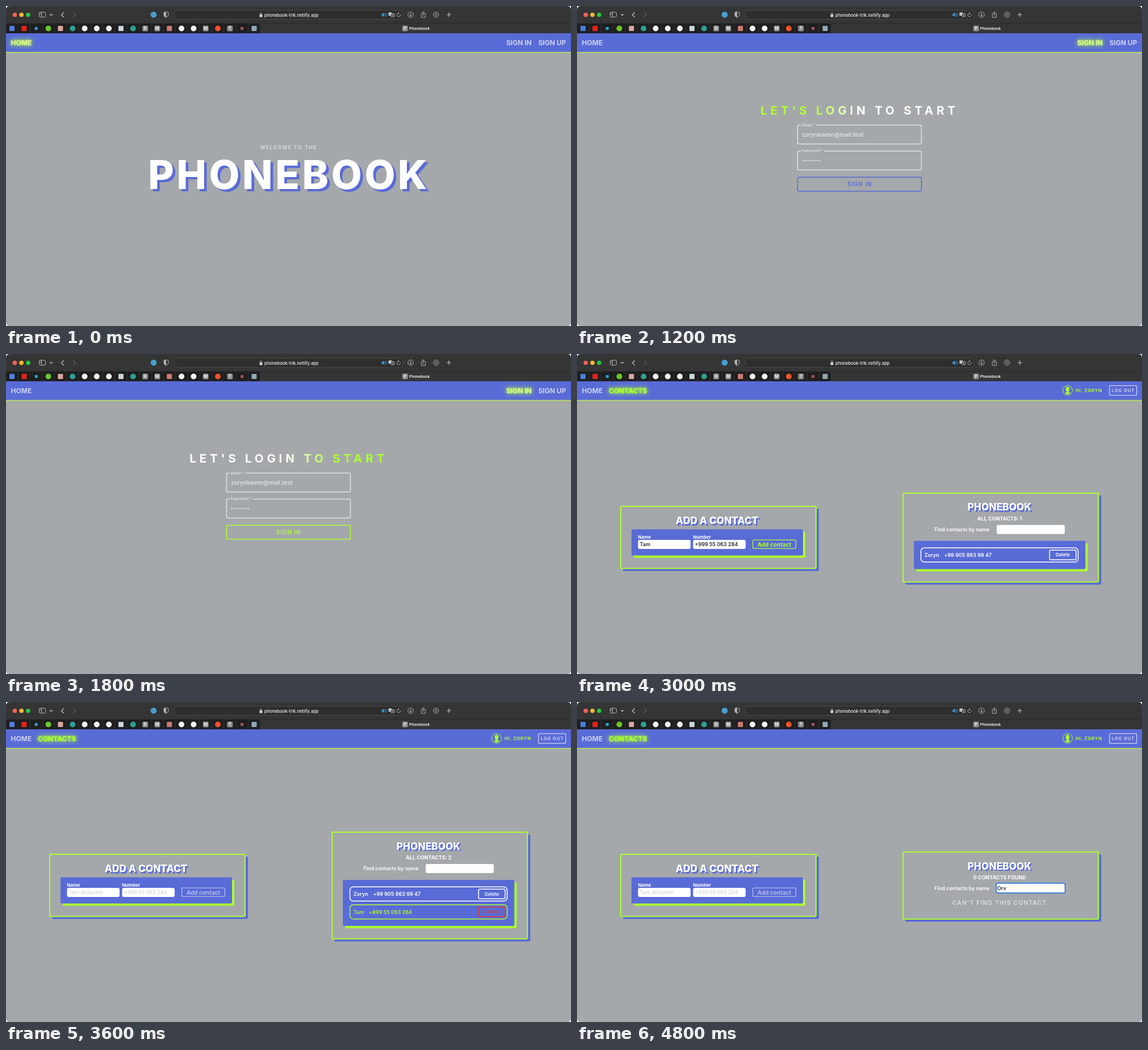
Recreate the animation shown at these times as an HTML page. Size 995 by 563 pixels, loop 5400 ms.

```html
<!DOCTYPE html>
<html lang="en">
<head>
<meta charset="utf-8">
<title>Phonebook</title>
<style>
  html, body { margin: 0; width: 100%; height: 100%; overflow: hidden; background: #fff; }
  svg { display: block; width: 100%; height: 100%; }
  text { font-family: Inter, "Open Sans", sans-serif; white-space: pre; }
  .glow { filter: drop-shadow(0 0 1.5px #adff2f) drop-shadow(0 0 4px #adff2f); }
</style>
</head>
<body>
<svg viewBox="0 0 995 563">
  <defs>
    <clipPath id="window"><rect width="995" height="563" rx="6"/></clipPath>
    <linearGradient id="greenLeft" gradientUnits="userSpaceOnUse" x1="415" x2="497">
      <stop stop-color="#adff2f"/><stop offset="1" stop-color="#fff"/>
    </linearGradient>
    <linearGradient id="greenRight" gradientUnits="userSpaceOnUse" x1="490" x2="580">
      <stop stop-color="#fff"/><stop offset="1" stop-color="#adff2f"/>
    </linearGradient>
  </defs>
  <g clip-path="url(#window)"><g id="browser"></g><g id="page"></g></g>
</svg>
<script>
const GREEN = '#adff2f', BLUE = '#596bd6', GREY = '#a4a8ab', PALE = '#dfe1e2', LINK = '#cbd0f2', RED = '#dc3a35';
const STEP = 600;

const user = { name: 'Zoryn', phone: '+99 905 863 99 47' };
const friend = { name: 'Tam', phone: '+999 55 063 284' };

// Drawing helpers: each returns SVG markup.
const text = (x, y, size, content, { fill = '#fff', weight = 600, spacing = 0, anchor = 'start', cls = '' } = {}) =>
  `<text x="${x}" y="${y}" font-size="${size}" fill="${fill}" font-weight="${weight}" letter-spacing="${spacing}" text-anchor="${anchor}" class="${cls}">${content}</text>`;
const centered = (x, y, size, content, style) => text(x, y, size, content, { anchor: 'middle', ...style });
const rect = (x, y, w, h, { fill = 'none', stroke = 'none', width = 1.5, r = 2 } = {}) =>
  `<rect x="${x}" y="${y}" width="${w}" height="${h}" rx="${r}" fill="${fill}" stroke="${stroke}" stroke-width="${width}"/>`;
const circle = (x, y, r, fill, stroke = 'none') =>
  `<circle cx="${x}" cy="${y}" r="${r}" fill="${fill}" stroke="${stroke}"/>`;
const path = (d, stroke = '#b4b4b4', width = 1, fill = 'none') =>
  `<path d="${d}" stroke="${stroke}" stroke-width="${width}" fill="${fill}" stroke-linecap="round" stroke-linejoin="round"/>`;
const shadowed = (x, y, size, content, offset, spacing = 0) =>
  [[offset, BLUE], [0, '#fff']].map(([d, fill]) =>
    centered(x + d, y + d, size, content, { fill, weight: 800, spacing })).join('');

function favicons() {
  const icons = ['s4b7fe0', 's e8221c', 'd2f9fd8', 'c6cc62a', 'sdca6a0', 'c2c9f93', 'cf2f2f2', 'cf2f2f2', 'cf5f5f5',
    'scbd6da', 'c2c9f93', 'R', 'M', 'sd07a70', 'cf5f5f5', 'cf5f5f5', 'M', 'cf0522a', 'T', 'da8505c', 's93a7b5'];
  return icons.map((icon, i) => {
    const x = 10.6 + 21.32 * i, color = '#' + icon.slice(1).trim();
    const shape = icon.length === 1 ? letterIcon(x, icon)
      : icon[0] === 'c' ? circle(x, 39.5, 5, color)
      : icon[0] === 'd' ? rect(x - 2.5, 37, 5, 5, { fill: color, r: 0 })
      : rect(x - 4.5, 35, 9, 9, { fill: color, r: 1 });
    return shape + path(`M${x + 10.7} 32V47`, '#3d3d3d', .7);
  }).join('');
}

const letterIcon = (x, letter) =>
  rect(x - 5, 34.5, 10, 10, { fill: '#8d8d91' }) + centered(x, 42.2, 7.2, letter);

function browserChrome() {
  return rect(0, 0, 995, 48, { fill: '#353535', r: 0 })
    + rect(0, 31, 447, 17, { fill: '#1f1f1f', r: 0 }) + path('M0 30.7H995', '#262626', .7)
    + ['#ff5f57', '#febc2e', '#28c840'].map((c, i) => circle(15.4 + 11.8 * i, 15.5, 3.8, c)).join('')
    + rect(58.5, 11, 11, 8.6, { stroke: '#b4b4b4', width: 1 }) + path('M62.5 11V19.5M60 13.2H61M60 15.2H61')
    + path('M77.5 14.5L79.7 16.5L81.9 14.5', '#c4c4c4', 1.1)
    + path('M101.5 11.5L97.5 15.5L101.5 19.5', '#c4c4c4', 1.2) + path('M118.5 11.5L122.5 15.5L118.5 19.5', '#5c5c5c', 1.2)
    + circle(260, 15.2, 5.3, '#459fd2')
    + path('M282 10.3L286 11.6V15.5Q286 18.7 282 20.2Q278 18.7 278 15.5V11.6Z', '#b4b4b4', .9)
    + path('M282 10.3V20.2Q278 18.7 278 15.5V11.6Z', 'none', 0, '#b4b4b4')
    + rect(296.5, 7.5, 402, 16, { fill: '#2e2e2e', stroke: '#4b4b4b', width: .9, r: 4 })
    + rect(446.5, 15, 5, 4.4, { fill: '#d5d5d5', r: .8 }) + path('M447.4 15V13.8Q447.4 12.3 449 12.3T450.6 13.8V15', '#d5d5d5', .9)
    + text(455, 18.6, 7.5, 'phonebook-trlk.netlify.app', { fill: '#f0f0f0', weight: 500 })
    + path('M661.8 14H663.3L665.6 12V19L663.3 17H661.8Z', '#3d9be0', .5, '#3d9be0') + path('M667.3 13.6Q668.6 15.5 667.3 17.4M669 12.2Q671.2 15.5 669 18.8', '#3d9be0', .9)
    + rect(673.5, 11.3, 6, 5.6, { fill: '#c4c4c4', r: 1.2 }) + rect(678, 13.4, 6, 5.6, { fill: '#2e2e2e', stroke: '#c4c4c4', width: .9, r: 1.2 })
    + centered(681, 18, 4.2, 'A', { fill: '#c4c4c4' })
    + path('M694.3 14.8A3.1 3.1 0 1 1 692.2 12.8L690.8 11.5M692.2 12.8L690.8 14', '#c4c4c4', .9)
    + circle(712.6, 15.3, 4.8, 'none', '#b4b4b4') + path('M712.6 12.7V17.7M710.6 15.9L712.6 17.8L714.6 15.9')
    + path('M733 13.7H731.3V20H738.7V13.7H737M735 17V10.2M733 12L735 10L737 12')
    + circle(757.4, 15.3, 4.6, 'none', '#b4b4b4') + circle(757.4, 15.3, 1.9, 'none', '#b4b4b4')
    + path('M776.3 15.3H783.3M779.8 11.8V18.8', '#c4c4c4', 1.1)
    + favicons() + letterIcon(702.8, 'P') + text(710, 42, 6.6, 'Phonebook')
    + rect(0, 48, 995, 515, { fill: GREY, r: 0 }) + rect(0, 48, 995, 33, { fill: BLUE, r: 0 })
    + rect(0, 80.8, 995, 1.6, { fill: '#b4e657', r: 0 });
}

function navLink(x, label, active, activeFill = '#e2f3a4') {
  return text(x, 69, 12, label, { weight: 700, fill: active ? activeFill : LINK, cls: active ? 'glow' : '' });
}

const guestNav = active =>
  [[8.5, 'HOME'], [881, 'SIGN IN'], [937.5, 'SIGN UP']].map(([x, label]) => navLink(x, label, label === active)).join('');

const memberNav = () => navLink(8.5, 'HOME') + navLink(56, 'CONTACTS', true, GREEN)
  + circle(864, 64, 8.5, 'none', GREEN)
  + `<ellipse cx="864" cy="62" rx="3.3" ry="4.2" fill="${GREEN}"/>` + path('M862.4 65H865.6V67L869 68.8Q864 73 859 68.8L862.4 67Z', 'none', 0, GREEN)
  + text(878, 66.8, 7.8, `HI, ${user.name.toUpperCase()}`, { fill: GREEN, weight: 700, spacing: .8 })
  + rect(937.7, 55.7, 48, 17, { stroke: LINK, width: 1.3 })
  + centered(962, 66.8, 7.8, 'LOG OUT', { fill: LINK, weight: 700, spacing: .8 });

const home = () => guestNav('HOME')
  + centered(498, 252.2, 8.6, 'WELCOME TO THE', { fill: PALE, spacing: 1.6 })
  + shadowed(498.3, 321.5, 70, 'PHONEBOOK', 4.6, 4.6);

function field(y, label, notch, value) {
  const content = typeof value === 'number'
    ? `<path d="M397.5 ${y + 17.3}h${3.7 * (value - 1) + .1}" stroke="${PALE}" stroke-width="2.3" stroke-linecap="round" stroke-dasharray="0 3.7"/>`
    : text(396, y + 20.6, 10, value, { fill: PALE });
  return rect(388.5, y + .5, 218, 33.3, { stroke: PALE, r: 2.5 })
    + rect(394, y - 1, notch, 3, { fill: GREY, r: 0 })
    + text(396, y + 2.5, 6.6, label + ' *', { fill: PALE }) + content;
}

function authPage(active, title, gradient, fields, color) {
  const buttonY = 209.5 + 45.7 * fields.length;
  return guestNav(active)
    + centered(497.6, 191, 20.5, title, { fill: `url(#${gradient})`, weight: 700, spacing: 5.8 })
    + fields.map((f, i) => field(209 + 45.7 * i, ...f)).join('')
    + rect(388.5, buttonY + .4, 218, 24.4, { stroke: color, r: 2.5 })
    + centered(497.8, buttonY + 16.3, 10, active, { fill: color, spacing: .9 });
}

const signUp = () => authPage('SIGN UP', "LET'S CREATE YOUR ACCOUNT", 'greenLeft',
  [['Name', 29, user.name], ['Email', 28, 'zrnktvzrnkl@mail.test'], ['Password', 41, 11]], BLUE);
const signIn = (gradient, color) => authPage('SIGN IN', "LET'S LOGIN TO START", gradient,
  [['Email', 28, 'zorynkwmn@mail.test'], ['Password', 41, 9]], color);

const card = (x, y, h) => rect(x + 4, y + 4, 345, h + .5, { fill: BLUE })
  + rect(x, y, 344, h, { fill: GREY, stroke: GREEN, width: 2 });
const panel = (x, y, h) => rect(x + 4, y + 4, 302, h, { fill: GREEN }) + rect(x, y, 302, h, { fill: BLUE });

function addForm(filled) {
  const input = (x, label, sample, value) => text(x, 325, 8, label, { weight: 700 })
    + rect(x, 327, 92.5, 16, { fill: '#fff', r: 3 })
    + text(x + 3, 338.3, 9, filled ? value : sample, { fill: filled ? '#2b2b2b' : '#d9d9d9' });
  const color = filled ? GREEN : '#b2baeb';
  return card(77, 268, 109.3) + shadowed(246.7, 299, 17.3, 'ADD A CONTACT', 2.5)
    + panel(96, 308.5, 46)
    + input(107.5, 'Name', 'Tam Wolpreth', friend.name) + input(204.5, 'Number', friend.phone, friend.phone)
    + rect(309.6, 327.2, 75.8, 15, { stroke: color, width: 1.3 })
    + centered(347.5, 338.5, 10, 'Add contact', { fill: color, weight: 700 });
}

function contactRow(y, { name, phone }, hovered) {
  const color = hovered ? GREEN : '#fff', buttonColor = hovered ? RED : '#fff';
  return rect(605.6, y, 277, 25, { stroke: color, r: 6 })
    + text(612, y + 15.8, 9, `${name}<tspan dx="8.5">${phone}</tspan>`, { fill: color })
    + rect(832.3, y + 4, 46.6, 17, { stroke: buttonColor })
    + centered(855.5, y + 15.4, 8, 'Delete', { fill: buttonColor });
}

function phonebook(top, height, summary, contacts, query, hovered) {
  const searchBox = query
    ? rect(738.4, top + 54.9, 121.2, 17.4, { fill: '#fff', stroke: '#4381d3', width: 2, r: 3 })
      + text(740, top + 67, 9, query, { fill: '#2b2b2b' })
    : rect(739, top + 56, 120, 16, { fill: '#fff', r: 3 });
  const list = contacts.length
    ? panel(593.3, top + 84, 18.5 + 31.3 * contacts.length)
      + contacts.map((c, i) => contactRow(top + 96.3 + 31.5 * i, c, i === hovered)).join('')
    : centered(744.3, top + 92.7, 10, "CAN'T FIND THIS CONTACT", { fill: PALE, spacing: 1.35 });
  return card(574.3, top, height) + shadowed(744, top + 30.7, 17.3, 'PHONEBOOK', 2.5)
    + centered(744.3, top + 48.3, 9, summary, { weight: 700 })
    + text(629.5, top + 67.2, 8.9, 'Find contacts by name') + searchBox + list;
}

const contactsPage = (filled, ...book) => memberNav() + addForm(filled) + phonebook(...book);

const scenes = [
  home(),
  signUp(),
  signIn('greenLeft', BLUE),
  signIn('greenRight', GREEN),
  contactsPage(false, 244.7, 156.5, 'ALL CONTACTS: 1', [user]),
  contactsPage(true, 244.7, 156.5, 'ALL CONTACTS: 1', [user]),
  contactsPage(false, 229, 187.7, 'ALL CONTACTS: 2', [user, friend], '', 1),
  contactsPage(false, 244.7, 156.5, '1 CONTACTS FOUND', [friend], friend.name),
  contactsPage(false, 263.8, 118.3, '0 CONTACTS FOUND', [], 'Orv'),
];

document.getElementById('browser').innerHTML = browserChrome();
const page = document.getElementById('page');
let shown = -1;

function render() {
  const index = Math.floor(performance.now() / STEP) % scenes.length;
  if (index !== shown) page.innerHTML = scenes[shown = index];
  requestAnimationFrame(render);
}
render();
</script>
</body>
</html>
```
